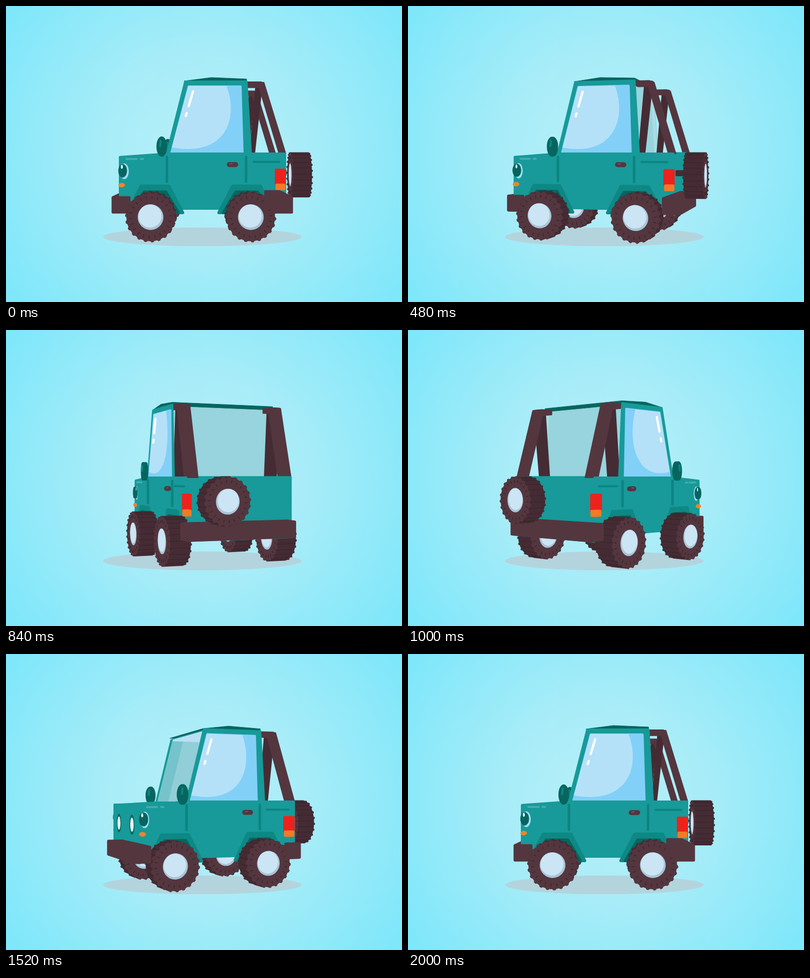
Write an HTML page that moves like this. It is 800 px wide and 600 px high and loops after 2.04 s.

```html
<!DOCTYPE html>
<html lang="en">
<head>
<meta charset="utf-8">
<title>Turning jeep</title>
<style>
html, body { margin: 0; width: 100%; height: 100%; overflow: hidden; background: #80e7fa; }
svg { display: block; width: 800px; height: 600px; }
</style>
</head>
<body>
<svg viewBox="0 0 800 600" xmlns="http://www.w3.org/2000/svg">
  <defs>
    <radialGradient id="sky" gradientUnits="userSpaceOnUse" cx="400" cy="300" r="480">
      <stop offset="0" stop-color="#b9f0f7"/>
      <stop offset=".45" stop-color="#a6ecf8"/>
      <stop offset="1" stop-color="#7fe7fa"/>
    </radialGradient>
  </defs>
  <rect width="800" height="600" fill="url(#sky)"/>
  <ellipse cx="396.5" cy="468" rx="200.5" ry="19" fill="#b3d4dd"/>
  <g id="car"></g>
</svg>
<script>
const LOOP = 2040, TURN = 2000, STEP = 40, TAU = Math.PI * 2;
const DIST = 1400, CX = 401, CY = 300;
const LEFT = 97, RIGHT = -113, MID = (LEFT + RIGHT) / 2;
const TEAL = '#179a99', FENDER = '#0e8884', LINE = '#0c8481', DEEP = '#07655f';
const BROWN = '#54363f', TREAD = '#452c34', GROOVE = '#3b252c';
const GLASS = '#97d4dd';
const PROFILE_SCALE = DIST / (DIST - LEFT);

let sin = 0, cos = 1, out = '';

// Perspective view of a point in car space: x to the tail, y down, z to the left side.
function project([x, y, z]) {
  const s = DIST / (DIST - z * cos - x * sin);
  return [CX + (x * cos - z * sin) * s, CY + y * s];
}

// Shapes are written in pixels of the side view and stored as car-space [x, y].
const spot = (px, py) => [(px - CX) / PROFILE_SCALE, (py - CY) / PROFILE_SCALE];
const taper = (top, topL, topR, bottom, botL, botR) =>
  [spot(topL, top), spot(topR, top), spot(botR, bottom), spot(botL, bottom)];
const box = (l, r, t, b) => taper(t, l, r, b, l, r);
const around = (count, point) => Array.from({ length: count }, (_, i) => point(i / count * TAU));
const oval = (px, py, rx, ry) =>
  around(28, a => spot(px + rx * Math.cos(a), py + ry * Math.sin(a)));
const at = (pts, z) => pts.map(([x, y]) => [x, y, z]);

function emit(flat, fill, round = 0) {
  const d = flat.map(p => p[0].toFixed(1) + ' ' + p[1].toFixed(1)).join('L');
  out += `<path d="M${d}Z" fill="${fill}" stroke="${fill}" stroke-width="${round}" stroke-linejoin="round"/>`;
}
const face = (pts, fill, round) => emit(pts.map(project), fill, round);

function line(a, b, color, width) {
  const [p, q] = [a, b].map(v => project(v).map(n => n.toFixed(1)));
  out += `<path d="M${p}L${q}" stroke="${color}" stroke-width="${width}" stroke-linecap="round"/>`;
}

// Silhouette of a convex solid.
function solid(pts, fill, round) {
  const p = pts.map(project).sort((a, b) => a[0] - b[0] || a[1] - b[1]);
  const half = list => {
    const h = [];
    for (const q of list) {
      while (h.length > 1) {
        const [a, b] = h.slice(-2);
        if ((b[0] - a[0]) * (q[1] - a[1]) - (b[1] - a[1]) * (q[0] - a[0]) > 0) break;
        h.pop();
      }
      h.push(q);
    }
    return h.slice(0, -1);
  };
  emit([...half(p), ...half(p.reverse())], fill, round);
}
const extrude = (pts, z0, z1, fill, round) => solid([...at(pts, z0), ...at(pts, z1)], fill, round);

const NOSE = spot(229, 0)[0], TAIL = spot(565, 0)[0];
const BODY = [spot(230, 306), spot(326, 299), ...box(326, 564, 299, 411).slice(1, 3), spot(230, 411)];
const DOOR = taper(153, 362, 486, 303, 324, 495);
const WINDOW = taper(163, 369, 474, 297, 334, 478);
const CABIN = taper(156, 363, 484, 300, 327, 493);
const ROOF = [spot(360, 152), spot(415, 145), spot(486, 148), spot(486, 152)];
const MIRROR = oval(315, 285, 10, 20);
const LENS = oval(236, 334, 8, 13);
const SIGNAL = oval(234, 363, 6, 4);
const BARS = [
  taper(164, 506, 517, 300, 494, 502),
  box(488, 516, 154, 163),
  taper(155, 511, 521, 299, 554, 565)
];
const AXLES = [294, 493];

// Pale part of the window: everything ahead of one bowed edge.
const SHINE = Array.from({ length: 17 }, (_, i) => {
  const t = i / 16, u = 1 - t;
  const mix = (a, b, c, d) => u * u * u * a + 3 * u * u * t * b + 3 * u * t * t * c + t * t * t * d;
  return spot(mix(445, 470, 440, 336), mix(163, 232, 305, 286));
}).concat([WINDOW[0]]);

function wheel([x, y, z], axis, R, half) {
  const lugs = 22, camera = axis === 'z' ? DIST * cos - z : DIST * sin - x;
  const front = camera > 0 ? half : -half;
  const rim = (off, r, a, lift = 0) => {
    const u = r * Math.cos(a) - lift / 2, v = r * Math.sin(a) - lift;
    return axis === 'z' ? [x + u, y + v, z + off] : [x + off, y + v, z + u];
  };
  const disc = (off, r, lift) => around(48, a => rim(off, r, a, lift));
  const lug = i => (i + .25) / lugs * TAU;

  solid([...disc(-half, R * .95), ...disc(half, R * .95)], TREAD, 1);
  for (let i = 0; i < lugs; i++) line(rim(-half, R * .955, lug(i)), rim(half, R * .955, lug(i)), TREAD, 5);
  for (let i = 0; i < lugs; i++) {
    const a = lug(i + .5);
    if (Math.cos(a) * (axis === 'z' ? sin : cos) > .03)
      line(rim(-half, R * .94, a), rim(half, R * .94, a), GROOVE, 1.5);
  }
  if (Math.abs(camera) <= half) return;
  face(around(176, a => rim(front, R * (.965 + .035 * Math.max(-1, Math.min(1, 2.2 * Math.sin(a * lugs)))), a)), BROWN, 1);
  for (let i = 0; i < lugs; i++)
    line(rim(front, R * .75, lug(i + .5)), rim(front, R * .84, lug(i + .5)), GROOVE, 1.5);
  face(disc(front, R * .51), '#a9c4d4');
  face(disc(front, R * .46, R * .045), '#cbe5f4');
}

// Parts that stand out from a side.
function drawTrim(z) {
  const outward = Math.sign(z);
  const bulge = (shape, depth, fill, round) => extrude(shape, z, z + outward * depth, fill, round);
  bulge(LENS, 5, DEEP, 1);
  bulge(SIGNAL, 4, '#f5822a', 1);
  bulge(MIRROR, 9, DEEP, 1);
  line([...spot(313, 273), z + outward * 9], [...spot(312, 284), z + outward * 9], '#0d8581', 4);
}

function drawSide(z) {
  const put = (shape, fill, round) => face(at(shape, z), fill, round);
  const mark = (x0, y0, x1, y1, color, width) => line([...spot(x0, y0), z], [...spot(x1, y1), z], color, width);
  put(DOOR, TEAL, 4);
  put(WINDOW, '#82d0f8', 4);
  put(SHINE, '#b4e1f7', 2);
  mark(378, 173, 369, 203, '#fff', 4.5);
  mark(365, 217, 363, 223, '#fff', 4.5);
  put(BODY, TEAL, 4);
  AXLES.forEach((axle, i) => {
    const c = axle + (i ? -7 : 7);
    put(taper(365, c - 28, c + 28, 419, c - 56, c + 56), FENDER, 6);
    put(taper(377, c - 22, c + 22, 419, c - 47, c + 47), DEEP, 6);
  });
  mark(325, 306, 325, 356, LINE, 5);
  mark(485, 306, 485, 356, LINE, 5);
  mark(500, 316, 552, 316, LINE, 4);
  mark(243, 310, 264, 310, '#43acab', 4);
  mark(272, 310, 277, 310, '#43acab', 4);
  mark(451, 321.5, 464, 321.5, BROWN, 10);
  mark(452, 320, 457, 320, '#76545f', 2);
  put(oval(239, 335, 9, 16), '#9edcf5');
  drawTrim(z);
  put(oval(234, 326, 2, 4), '#fff');
  const inner = z - Math.sign(z) * 9;
  extrude(box(546, 563, 332, 362), z, inner, '#ee221d', 4);
  extrude(box(547, 563, 362, 372), z, inner, '#f47a24', 3);
}

function drawBars(z) {
  BARS.forEach((bar, i) => extrude(bar, z, z - Math.sign(z) * 22, i ? BROWN : TREAD, 2));
}

function drawEnd(x, top) {
  face([[x, top, LEFT], [x, top, RIGHT], [x, 112, RIGHT], [x, 112, LEFT]], TEAL, 3);
}

function drawFront() {
  drawEnd(NOSE, 5);
  const base = CABIN[3][0];
  face([[NOSE, 5, LEFT], [NOSE, 5, RIGHT], [base, 0, RIGHT], [base, 0, LEFT]], TEAL, 2);
  for (const z of [MID - 61, MID + 47]) {
    const disc = r => around(32, a => [NOSE, 43 + r * Math.sin(a), z + r * Math.cos(a)]);
    face(disc(19), DEEP);
    face(disc(13.5), '#e6f0ef');
  }
}

const bumper = end => end < 0 ? box(216, 249, 388, 418) : box(544, 577, 388, 418);

function drawWindshield(hidden) {
  const [high, , , low] = CABIN;
  const pane = inset => [[...low, LEFT - inset], [...low, RIGHT + inset],
    [...high, RIGHT + inset], [...high, LEFT - inset]];
  face(pane(0), TEAL, 3);
  face(pane(12), '#b9dff4');
  for (const z of hidden) {
    const inner = z - Math.sign(z) * 12;
    face(at(taper(160, 362, 570, 300, 326, 570), inner), '#91ced8');
    face(at(taper(160, 362, 388, 300, 326, 352), inner), '#76c3cb');
  }
}

// From behind, the open cabin shows pale glass.
function drawCabin(hidden) {
  extrude(CABIN, LEFT - 3, RIGHT + 3, GLASS, 1);
  for (const z of hidden) line([...spot(479, 166), z], [...spot(487, 296), z], '#a9dde4', 6);
}

function drawCar(angle) {
  sin = Math.sin(angle);
  cos = Math.cos(angle);
  out = '';
  const seen = [], hidden = [];
  (DIST * cos > LEFT ? seen : hidden).push(LEFT);
  (DIST * cos < RIGHT ? seen : hidden).push(RIGHT);
  const rearSeen = DIST * sin > TAIL, fromFront = DIST * sin < CABIN[3][0];
  const nearEnd = sin < 0 ? -1 : 1;
  const drawWheels = sides => sides
    .flatMap(z => AXLES.map(px => [spot(px, 0)[0], 117, MID + Math.sign(z) * 108]))
    .sort((a, b) => a[2] * cos + a[0] * sin - b[2] * cos - b[0] * sin)
    .forEach(c => wheel(c, 'z', 46.5, 20));
  const drawSpare = () => {
    extrude(box(560, 573, 334, 345), 30, 44, TREAD, 1);
    wheel([186, 41, 40], 'x', 44, 18);
  };

  drawWheels(hidden);
  extrude(bumper(-nearEnd), LEFT, RIGHT, BROWN, 5);
  if (!rearSeen) drawSpare();
  hidden.forEach(drawTrim);
  if (fromFront) hidden.forEach(drawBars);
  extrude(ROOF, LEFT, RIGHT, DEEP, 1);
  if (fromFront) drawWindshield(hidden);
  else {
    drawCabin(hidden);
    hidden.forEach(drawBars);
  }
  if (DIST * sin < NOSE) drawFront();
  if (rearSeen) drawEnd(TAIL, -2);
  for (const z of seen) {
    drawBars(z);
    drawSide(z);
    face(at(bumper(-nearEnd), z), BROWN, 5);
  }
  drawWheels(seen);
  extrude(bumper(nearEnd), LEFT + 2, RIGHT - 2, BROWN, 5);
  if (rearSeen) drawSpare();
  document.getElementById('car').innerHTML = out;
}

// Cubic ease with horizontal handles at both ends.
function ease(p) {
  let lo = 0, hi = 1;
  for (let i = 0; i < 30; i++) {
    const s = (lo + hi) / 2, u = 1 - s;
    if (3 * u * u * s * .81 + 3 * u * s * s * .28 + s * s * s < p) lo = s; else hi = s;
  }
  return lo * lo * (3 - 2 * lo);
}

const start = performance.now();
let last = -1;
function tick() {
  const elapsed = Math.max(0, performance.now() - start) % LOOP;
  const t = Math.floor(elapsed / STEP) * STEP;
  if (t !== last) {
    last = t;
    drawCar(t >= TURN ? 0 : ease(t / TURN) * TAU);
  }
  requestAnimationFrame(tick);
}
tick();
</script>
</body>
</html>
```
